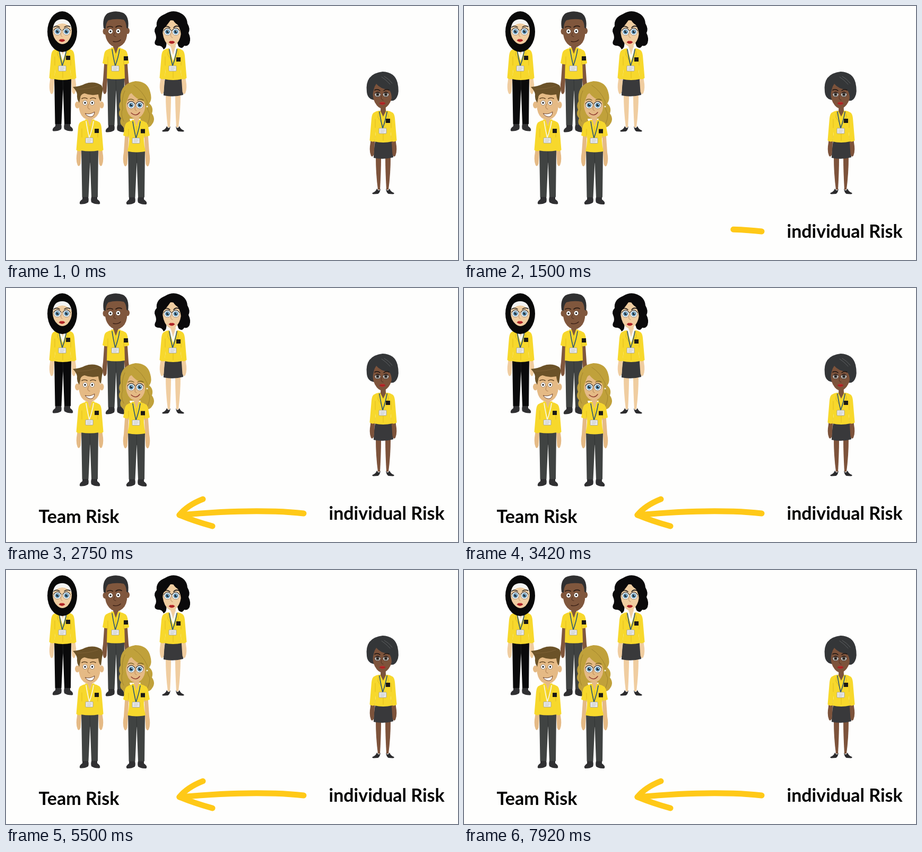
An HTML page for the animation above (8000 ms loop, 852 px wide and 480 px high).

```html
<!DOCTYPE html>
<html lang="en">
<head>
<meta charset="utf-8">
<title>Individual and team risk</title>
<style>
  html, body { margin: 0; width: 100%; height: 100%; overflow: hidden; background: #fefefd; }
  svg { display: block; width: 100vw; height: 100vh; }
  text { font: 700 34px Lato, Carlito, sans-serif; fill: #000; white-space: pre; }
</style>
</head>
<body>
<svg id="stage" viewBox="0 0 852 480">
  <g id="people"></g>
  <g id="arrow" fill="none" stroke="#ffc918" stroke-width="11" stroke-linecap="round" stroke-linejoin="round">
    <path pathLength="1" visibility="hidden" d="M561 426Q470 416 328 429"/>
    <path pathLength="1" visibility="hidden" d="M371 399Q341 411 327 429"/>
    <path pathLength="1" visibility="hidden" d="M327 429Q356 441 389 450"/>
  </g>
  <text id="single" x="608.5" y="438"></text>
  <text id="team" x="61.5" y="444"></text>
</svg>
<script>
(() => {
const LOOP = 8000;
const YELLOW = '#f7d82c', EDGE = '#d8b41c', GREY = '#404342', INK = '#2b2b2d', SHOE = '#303032';
const PALE = '#f0cda0', TAN = '#e5ba85', BROWN = '#80573d', DEEP = '#7d533b';

const shape = (d, fill, extra = '') => `<path d="${d}" fill="${fill}" ${extra}/>`;
const line = (d, color, w = 1) =>
  `<path d="${d}" fill="none" stroke="${color}" stroke-width="${w}" stroke-linecap="round" stroke-linejoin="round"/>`;
const disc = (x, y, rx, fill, ry = rx, extra = '') =>
  `<ellipse cx="${x}" cy="${y}" rx="${rx}" ry="${ry}" fill="${fill}" ${extra}/>`;
const both = s => `${s}<g transform="scale(-1 1)">${s}</g>`;
const at = (x, y, s) => `<g transform="translate(${x} ${y})">${s}</g>`;

// Bodies: the origin is the middle of the collar.
function trousers(color) {
  return both(shape('M-14 139L-4 139Q-1 148 -3 153Q-9 157 -18 156.5Q-22 153 -14 147Z', SHOE)) +
    shape('M-16 52L16 52L15 143L3 143L0.5 76L-2.5 143L-14.5 143Z', color) +
    line('M0 56L0.5 78', '#2c2e2e', 0.7);
}

function skirt(skin) {
  return both(
    shape('M-14 86L-4 86Q-4 112 -6 147L-10 147Q-14 116 -14 86Z', skin) +
    shape('M-12 145Q-14 151 -20 153Q-22 155 -18 155.5L-10 155Q-6 153 -5 145Q-8 152 -12 145Z', INK)) +
    shape('M-15 55L16 55Q19 70 19 86Q0 91 -18 87Q-18 70 -15 55Z', '#39393b');
}

function shirt(o) {
  const arm = shape('M-21 14L-24 58Q-27 74 -23 83Q-20 87 -17.5 80L-16 58L-14 16Z', o.skin);
  const sleeve = o.short
    ? 'M-17 1Q-21 3 -22 9L-25 26Q-20 29 -15 28L-12 14Z'
    : 'M-17 1Q-21 3 -22 12L-25.5 54Q-21 58 -16.5 55.5L-11 16Z';
  const torso = o.slim
    ? 'M-8 -2Q-17 -1 -20 5L-15 20Q-12 36 -17 56Q0 60 17 56Q12 36 15 20L20 5Q17 -1 8 -2Z'
    : 'M-8 -2Q-17 -1 -20 5L-16 20L-17 55Q0 58 17 55L16 20L20 5Q17 -1 8 -2Z';
  return both(arm + shape(sleeve, YELLOW)) + shape(torso, YELLOW) +
    both(line('M-15 14L-15 30', EDGE, 0.7));
}

function trim(o) {
  const strap = o.strap || '#2f5872', [x, y] = o.mark;
  return shape('M-4.5 -14L4.5 -14L5 -1L0 9L-5 -1Z', o.skin) +
    (o.inner ? shape('M-8 -3L-4 -4L0 10L4 -4L8 -3L0 22Z', '#f8f8f4') : '') +
    (o.jacket ? both(line('M-8 -1L-10 10L-1 25', EDGE, 0.9)) + line('M0 25L0 54', EDGE, 0.7)
              : both(shape('M-8 -4L-4 -3L0 9L-5 11L-10 0Z', YELLOW)) + line('M0 9L0 24', EDGE, 0.7)) +
    line('M-7 0Q-5 14 -1 31', strap, 1.7) + line('M7 0Q5 14 -1 31', strap, 1.7) +
    `<rect x="-8" y="31" width="14" height="10" rx="1" fill="#ececea" stroke="#999" stroke-width=".8"/>` +
    line('M-5 34L3 34M-5 36.3L3 36.3M-5 38.5L1 38.5', '#b5bbc0', 0.8) +
    `<rect x="${x}" y="${y}" width="8" height="8" fill="#1b1a16"/>`;
}

const figure = (x, y, o) => at(x, y, o.lower + shirt(o) + trim(o));

// Faces
const roundEye = (x, y) =>
  disc(x, y, 6.8, '#fff', 7, 'stroke="#56493d" stroke-width=".6"') +
  disc(x, y + 0.3, 4.6, '#5c8fae') + disc(x, y + 0.3, 2.2, '#18222c') + disc(x + 1.2, y - 1, 0.9, '#fff') +
  line(`M${x - 7} ${y - 2}Q${x} ${y - 11} ${x + 7} ${y - 2}`, '#222', 1.1);

const dotEye = (x, y) =>
  disc(x, y, 4.2, '#fff', 4.4, 'stroke="#4a3a2c" stroke-width=".5"') + disc(x, y, 1.7, '#151515');

const lips = (x, y) =>
  shape(`M${x - 6} ${y}Q${x - 2} ${y - 4} ${x} ${y - 2}Q${x + 2} ${y - 4} ${x + 6} ${y}Q${x} ${y + 6} ${x - 6} ${y}Z`, '#bd2a2b') +
  line(`M${x - 5} ${y}Q${x} ${y + 1} ${x + 5} ${y}`, '#7d1719', 0.7);

function scarfHead() {
  return disc(106, 48.5, 28, '#090909', 38.5) +
    shape('M88 47Q89 26 106 26Q123 26 124 47Q124 59 116 68Q106 76 97 68Q88 60 88 47Z', PALE) +
    shape('M88.5 43Q90 25 106 25Q121 25 123.5 43Q116 33 106 33Q95 34 88.5 43Z', '#f4f4f2') +
    roundEye(97, 48) + roundEye(114, 48) +
    line('M90 40Q95 36 101 40M110 40Q115 36 121 39', '#25201c', 1.5) +
    line('M104 50Q102 57 106 58', '#b98d62', 0.9) + lips(105.5, 65);
}

function shortHead() {
  return disc(186.5, 48, 4, BROWN, 6) + disc(229, 47, 4, BROWN, 6) +
    shape('M187 32Q194 18 208 18Q225 18 228 32L228 56Q226 71 214 77Q207 80 199 75Q189 68 187 54Z', BROWN) +
    shape('M184 42Q181 22 191 14Q206 7 221 13Q233 20 230 43L227 41Q227 31 222 26Q207 23 193 27Q188 32 188 43Z', '#303031') +
    dotEye(197, 48) + dotEye(211.5, 47.5) +
    line('M191 40Q196 37 201 40M207 40Q212 36 218 39', '#281b14', 1.7) +
    line('M205 50Q200 58 207 58', '#4c2e20', 1) + line('M202 67Q211 69 216 64', '#3a2017', 1.3);
}

function wavyHead() {
  return shape('M300 15Q313 7 326 12Q341 18 342 33Q348 43 344 51Q349 61 346 70Q343 77 336 75Q331 83 325 76L314 40L302 66Q304 79 297 82Q294 74 286 75Q278 73 281 66Q285 60 281 51Q278 44 284 38Q282 22 300 15Z', '#0b0a0b') +
    shape('M295 44Q297 27 312 27Q329 28 330 47Q330 61 323 70Q313 82 303 71Q295 61 295 44Z', PALE) +
    shape('M313 22Q306 34 297 43L293 58Q290 34 304 21Q318 12 330 30Q335 43 331 60Q329 43 324 36Q316 31 313 22Z', '#0b0a0b') +
    roundEye(304.5, 48.5) + roundEye(320, 48.5) +
    line('M299 40Q303 36 309 41M316 41Q320 36 326 39', '#171313', 1.5) +
    line('M311 51Q309 59 314 60', '#b98d62', 0.9) + lips(312.5, 68.5);
}

function quiffHead() {
  return disc(134.5, 187, 4.5, TAN, 6.5) + disc(180.5, 187, 4, TAN, 6.5) +
    shape('M138 164Q157 153 176 164L178 188Q177 205 167 212Q157 219 146 211Q138 204 137 188Z', TAN) +
    shape('M126 153Q140 152 149 147Q166 141 180 150Q184 156 181 165L179 181Q175 177 174 167Q160 170 148 165Q140 167 140 174L138 183Q133 176 134 167Q133 160 126 153Z', '#6b5228') +
    line('M134 157Q153 158 173 151', '#806337', 0.9) +
    dotEye(149, 183) + dotEye(162.5, 183) +
    line('M143 175Q148 172 153 175M159 175Q164 172 169 175', '#60421f', 1.5) +
    line('M156 185Q151 194 158 195', '#ad7d4e', 1) +
    shape('M149 203Q158 206 167 200Q166 211 157 209Q152 208 149 203Z', '#fff', 'stroke="#70442c" stroke-width="1"');
}

function curlyHair() {
  return shape('M244 142Q267 142 272 163Q276 177 270 184Q279 192 275 203Q283 214 275 224Q271 231 261 229Q253 234 248 229L254 213L233 213Q239 232 230 238Q221 239 222 229Q212 223 217 212Q210 205 215 196Q211 187 216 180Q212 147 244 142Z', '#c0a13b');
}

function curlyHead() {
  return shape('M226 184Q227 164 244 163Q262 164 263 184Q263 199 255 208Q244 217 234 208Q226 200 226 184Z', TAN) +
    shape('M235 163Q229 174 225 190Q224 202 229 215Q219 205 218 187Q217 157 240 149Q263 149 267 177Q271 189 267 204L262 209Q264 190 260 180Q247 178 235 163Z', '#c0a13b') +
    line('M224 160Q217 174 220 194Q215 205 222 218M241 150Q257 160 266 180Q265 194 271 204Q271 214 267 223', '#a3862d', 1) +
    roundEye(236, 187) + roundEye(252, 187) +
    line('M230 178Q235 174 241 178M248 178Q254 174 259 178', '#7b6125', 1.4) +
    line('M244 189Q241 197 246 198', '#ad7d4e', 0.9) +
    line('M236 202Q245 210 252 201', '#923f32', 1.6) + disc(266, 190, 1.6, '#f3f0df');
}

function bobHead() {
  const eye = x => disc(x, 167, 5.5, '#eee', 4.8, 'stroke="#1d1512" stroke-width=".6"') +
    disc(x, 167.3, 3.5, '#66625c') + disc(x, 167.3, 1.7, '#151313') +
    shape(`M${x - 6} 166Q${x} 158 ${x + 6} 166Q${x} 163 ${x - 6} 166Z`, '#3c2921');
  return shape('M710 124Q733 125 738 145Q742 163 737 172Q733 180 726 179L695 178Q681 176 680 162Q676 128 710 124Z', '#343638') +
    shape('M691 158Q693 144 709 144Q727 145 728 164Q728 178 721 187Q710 200 699 188Q690 177 691 158Z', DEEP) +
    shape('M698 147Q692 155 691 172L687 176Q683 151 695 139Q714 130 732 150L733 169L727 176Q727 162 721 158Q706 157 698 147Z', '#343638') +
    line('M708 134Q716 139 724 148M713 133Q722 138 728 146', '#696b6d', 0.8) +
    eye(700.5) + eye(716) +
    line('M695 159Q700 156 705 160M712 160Q717 156 722 159', '#1c1513', 1.5) +
    line('M708 169Q705 177 711 178', '#4c2d20', 0.9) + lips(709.5, 184);
}

document.getElementById('people').innerHTML =
  figure(107, 82, { skin: PALE, lower: at(0, -2, trousers('#0a0a0b')), slim: 1, jacket: 1, inner: 1, mark: [6, 12] }) +
  scarfHead() +
  figure(207, 82, { skin: BROWN, lower: trousers(GREY), short: 1, mark: [15, 13] }) +
  shortHead() +
  figure(315, 82, { skin: PALE, lower: skirt(PALE), slim: 1, jacket: 1, inner: 1, mark: [6, 15] }) +
  wavyHead() +
  figure(158, 218, { skin: TAN, lower: trousers(GREY), strap: '#f7f5e8', mark: [9, 14] }) +
  quiffHead() + curlyHair() +
  figure(246, 218.5, { skin: TAN, lower: trousers(GREY), short: 1, slim: 1, mark: [8, 14] }) +
  curlyHead() +
  figure(711, 200, { skin: DEEP, lower: skirt(DEEP), slim: 1, jacket: 1, mark: [5, 13] }) +
  bobHead();

// Timeline
const KEY = 57;
const labels = [
  { el: document.getElementById('single'), text: 'individual Risk', start: 60 },
  { el: document.getElementById('team'), text: 'Team Risk', start: 2050 }
];
const strokes = [...document.querySelectorAll('#arrow path')];
const spans = [[1430, 1740], [1740, 1850], [1850, 1970]];

function render(t) {
  for (const { el, text, start } of labels) {
    const n = Math.max(0, Math.floor((t - start) / KEY) + 1);
    const shown = text.slice(0, n);
    if (el.textContent !== shown) el.textContent = shown;
  }
  strokes.forEach((el, i) => {
    const [a, b] = spans[i];
    const p = Math.min(1, Math.max(0, (t - a) / (b - a)));
    el.setAttribute('visibility', p > 0 ? 'visible' : 'hidden');
    el.setAttribute('stroke-dasharray', p < 1 ? `${p} 2` : 'none');
  });
}

function tick() {
  render(performance.now() % LOOP);
  requestAnimationFrame(tick);
}
render(0);
requestAnimationFrame(tick);
})();
</script>
</body>
</html>
```
